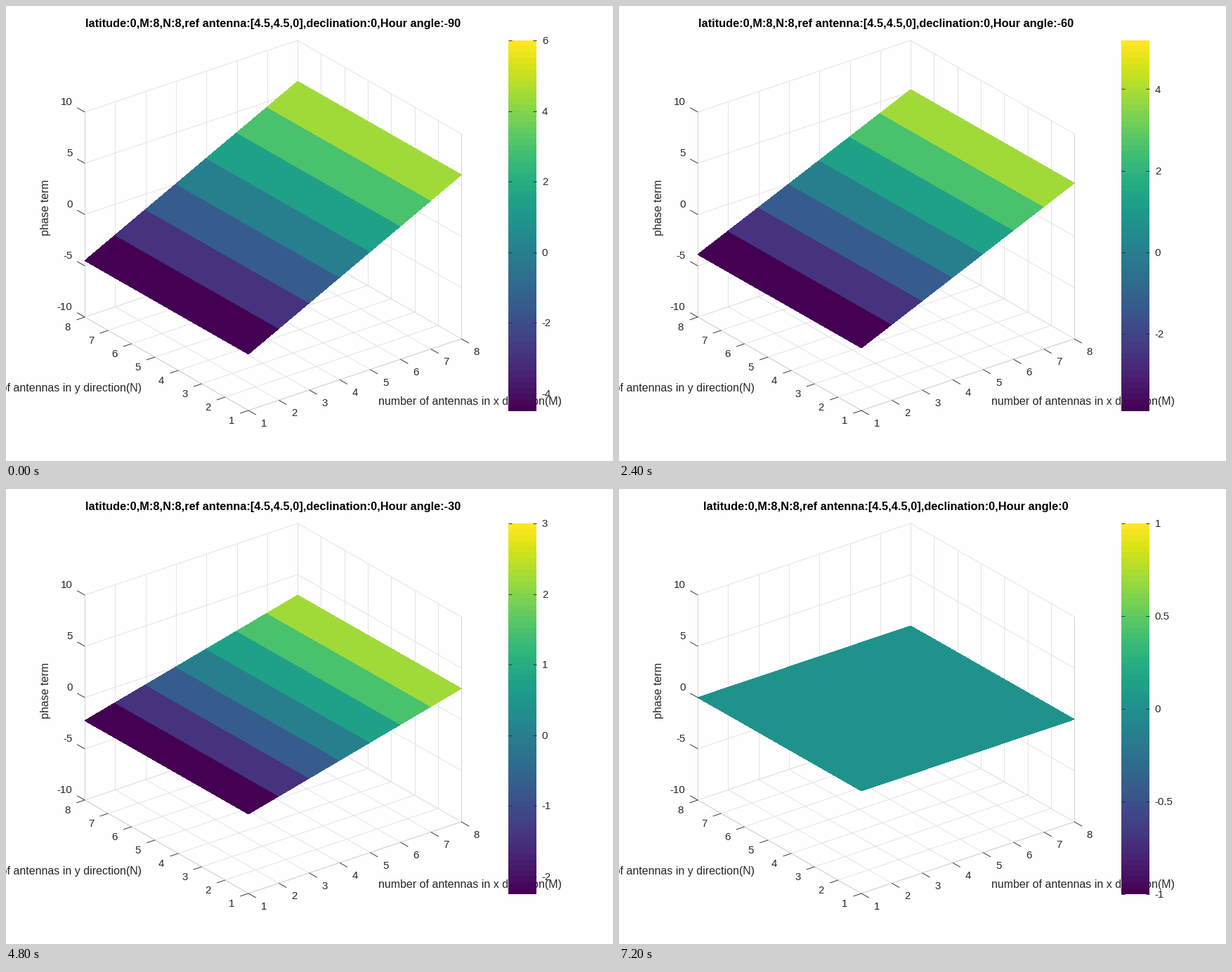
Write a matplotlib script that moves like this. It is 864 px wide and 648 px high and loops after 8 s.

```python
import math

import numpy as np
import matplotlib.pyplot as plt
from matplotlib.animation import FuncAnimation
from matplotlib.collections import LineCollection
from matplotlib.patches import Polygon

W, H = 864, 648
N = 8                       # antennas per direction
LEVELS = 64
PAPER, INK = "#fefefe", "#262626"
GRID, EDGE = "#e0e0e0", "#d5d0d0"
BAR_L, BAR_R, BAR_TOP, BAR_BOTTOM = 715, 755, 49, 577

plt.rcParams["font.family"] = "Liberation Sans"
cmap = plt.get_cmap("viridis", LEVELS)

fig = plt.figure(figsize=(W / 72, H / 72), dpi=72, facecolor=PAPER)
ax = fig.add_axes([0, 0, 1, 1])
ax.set_xlim(0, W)
ax.set_ylim(H, 0)
ax.axis("off")


def project(x, y, z):
    """Orthographic view of the plot box, in stage pixels."""
    u, v, w = (x - 1) / 7, (y - 1) / 7, (z + 10) / 20
    return (345.1 + 303 * u - 233 * v, 576 - 102 * u - 133 * v - 292 * w)


def segments(lines, color, width, zorder):
    coll = LineCollection(lines, colors=color, linewidths=width, zorder=zorder)
    ax.add_collection(coll, autolim=False)
    return coll


def label(x, y, s, size=15, ha="center", **kw):
    kw = {"color": INK, "zorder": 2, **kw}
    return ax.text(x, y, s, fontsize=size, ha=ha, va="baseline", **kw)


def edge(a, b):
    return [project(*a), project(*b)]


def draw_box():
    grid = []
    for k in range(1, N + 1):
        grid += [
            edge((k, 1, -10), (k, 8, -10)),
            edge((1, k, -10), (8, k, -10)),
            edge((k, 8, -10), (k, 8, 10)),
            edge((8, k, -10), (8, k, 10)),
        ]
    for z in range(-10, 11, 5):
        grid += [edge((1, 8, z), (8, 8, z)), edge((8, 1, z), (8, 8, z))]
    segments(grid, GRID, 0.9, 1)

    segments([
        edge((1, 8, -10), (1, 8, 10)),
        edge((8, 1, -10), (8, 1, 10)),
        edge((1, 1, -10), (8, 1, -10)),
        edge((1, 1, -10), (1, 8, -10)),
    ], EDGE, 1, 1.1)

    ticks = []

    def tick(point, dx, dy):
        px, py = project(*point)
        ticks.append([(px, py), (px + dx, py + dy)])
        return px, py

    for k in range(1, N + 1):
        px, py = tick((k, 1, -10), 10.9, 6.2)
        label(px + 21.9, py + 22.9, str(k))
        px, py = tick((1, k, -10), -11.8, 4)
        label(px - 24.3, py + 18.9, str(k))
    for z in range(-10, 11, 5):
        px, py = tick((1, 8, z), -10.9, -6.2)
        label(94.6, py - 10.4, str(z), ha="right")
    segments(ticks, INK, 0.9, 1.2)

    label(530, 568, "number of antennas in x direction(M)", 16, "left")
    label(193, 549, "number of antennas in y direction(N)", 16, "right")
    label(61.5, 287, "phase term", 16, rotation=90, rotation_mode="anchor")


def draw_bar():
    rows = np.linspace(BAR_BOTTOM, BAR_TOP, LEVELS + 1)
    ax.pcolormesh([BAR_L, BAR_R], rows, np.arange(LEVELS)[:, None],
                  cmap=cmap, vmin=0, vmax=LEVELS, zorder=4)


def tick_step(span):
    a = span / 5
    base = 10 ** math.floor(math.log10(a))
    x = a / base
    for limit, nice in ((2, 1), (10, 2), (50, 5)):
        if x < math.sqrt(limit):
            return nice * base
    return 10 * base


draw_box()
draw_bar()
title = label(380.3, 30, "", 16.4, color="black", weight="bold")
strips = [ax.add_patch(Polygon([(0, 0)] * 4, linewidth=0, antialiased=False,
                               zorder=3)) for _ in range(N - 1)]
bar_ticks = segments([], INK, 0.9, 5)
bar_labels = [label(762.8, 0, "", ha="left", zorder=6) for _ in range(8)]


def update(i):
    angle = -90 + 10 * i
    title.set_text("latitude:0,M:8,N:8,ref antenna:[4.5,4.5,0],"
                   f"declination:0,Hour angle:{angle}")

    slope = 1.5 * math.sin(math.radians(-angle))
    heights = [slope * (x - 4) for x in range(1, N + 1)]
    lo, hi = (heights[0], heights[-1]) if angle else (-1, 1)
    span = hi - lo

    for k, strip in enumerate(strips):
        x, z0, z1 = k + 1, heights[k], heights[k + 1]
        strip.set_xy([project(x, 1, z0), project(x + 1, 1, z1),
                      project(x + 1, 8, z1), project(x, 8, z0)])
        strip.set_facecolor(cmap(int((z0 - lo) / span * LEVELS)))

    step = tick_step(span)
    first = math.ceil(lo / step - 1e-9)
    last = math.floor(hi / step + 1e-9)
    marks = []
    for text in bar_labels:
        text.set_text("")
    for text, k in zip(bar_labels, range(first, last + 1)):
        y = BAR_BOTTOM - (k * step - lo) / span * (BAR_BOTTOM - BAR_TOP)
        marks += [[(BAR_L, y), (BAR_L + 5, y)], [(BAR_R - 5, y), (BAR_R, y)]]
        text.set_text(f"{k * step:g}")
        text.set_y(y + 5.2)
    bar_ticks.set_segments(marks)
    return [title, bar_ticks, *strips, *bar_labels]


anim = FuncAnimation(fig, update, frames=10, interval=800, repeat=True,
                     repeat_delay=0, blit=False)
plt.show()
```
